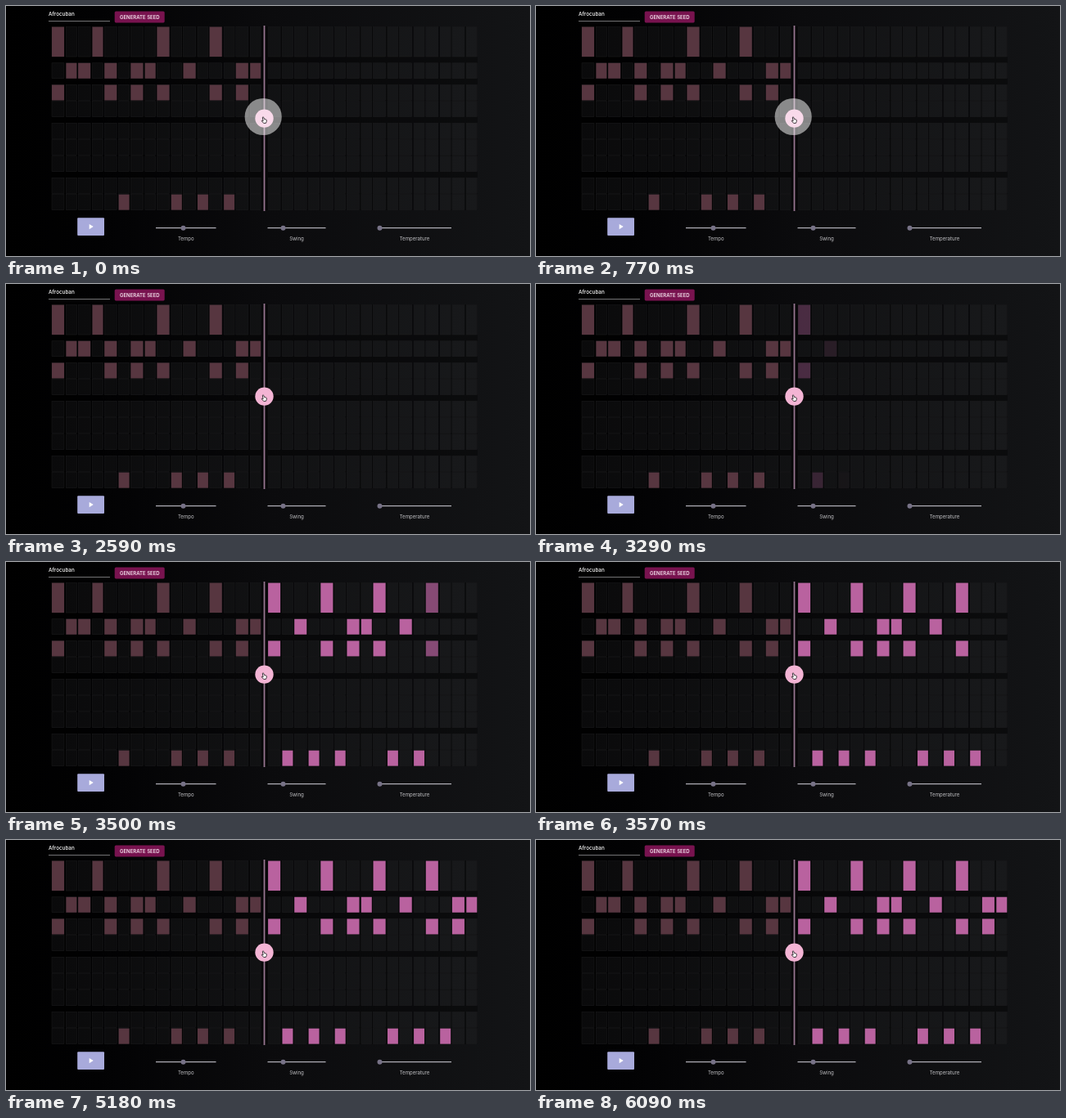
An HTML page for the animation above (6160 ms loop, 640 px wide and 306 px high).

```html
<!DOCTYPE html>
<html lang="en">
<head>
<meta charset="utf-8">
<title>Drum sequencer</title>
<style>
html, body { margin: 0; width: 100%; height: 100%; overflow: hidden; background: #000; }
svg { display: block; width: 100vw; height: 100vh; }
text { font-family: Inter, Roboto, sans-serif; }
.label { font-size: 6.1px; fill: #c2c2c5; text-anchor: middle; }
</style>
</head>
<body>
<svg id="stage" viewBox="0 0 640 306">
  <defs>
    <linearGradient id="bg">
      <stop offset="0" stop-color="#000"/>
      <stop offset=".18" stop-color="#020203"/>
      <stop offset=".5" stop-color="#0b0b0d"/>
      <stop offset="1" stop-color="#131416"/>
    </linearGradient>
    <linearGradient id="pad" gradientUnits="userSpaceOnUse" x1="56" x2="576">
      <stop stop-color="#0a0a0b"/>
      <stop offset="1" stop-color="#18191b"/>
    </linearGradient>
  </defs>
  <rect width="640" height="306" fill="url(#bg)"/>
  <text x="52" y="11.8" font-size="6.3" font-weight="500" fill="#fff">Afrocuban</text>
  <path d="M52 18.5H127" stroke="#737375"/>
  <rect x="132.7" y="6.4" width="61" height="14" rx="1.6" fill="#78134f"/>
  <text x="163.3" y="15.5" font-size="6" font-weight="600" fill="#f6e6ef" text-anchor="middle">GENERATE SEED</text>
  <rect x="55" y="25" width="521" height="225" opacity=".35"/>
  <g id="grid"></g>
  <path d="M315.5 24V251" stroke="#967590" stroke-width="1.8"/>
  <rect x="87.2" y="259.2" width="32.8" height="21.8" rx="1" fill="#a8aadb"/>
  <path d="M101.7 267V273.2L106.7 270.1Z" fill="#fff"/>
  <g id="sliders"></g>
  <circle cx="315.5" cy="137.6" r="11.2" fill="#f3b4d4"/>
  <circle id="ring" cx="314.2" cy="135.5" r="22.6" fill="#fff"/>
  <path d="M313.3 136.2q.9-.9 1.5.2l.7 2.1 1.7.3 1.1.8-.1 1.9-.8 1.9h-2.8l-2.3-2.6q-.1-.9 1-.5l.8.6Z"
    fill="#fff" stroke="#2b2128" stroke-width=".9" stroke-linejoin="round"/>
</svg>
<script>
const LOOP = 6160, STEP = 70, COLS = 16, LEFT = 56, RIGHT = 320.1;
const KICK = 0, SNARE = 1, HAT = 2, TOM = 8;

// One rule per drum: does it sound on column c?
const reply = {
  [KICK]: c => c % 4 === 0,
  [SNARE]: c => c % 4 === 2 || c % 8 === 7,
  [HAT]: c => c % 2 === 0 && c % 8 !== 2,
  [TOM]: c => c % 2 === 1 && c % 8 !== 7
};
const seed = {
  ...reply,
  [KICK]: c => c === 3 || c !== 4 && reply[KICK](c),
  [SNARE]: c => c === 1 || c === 4 || reply[SNARE](c),
  [TOM]: c => c > 4 && reply[TOM](c)
};

const $ = id => document.getElementById(id);
const clamp = v => Math.max(0, Math.min(1, v));

function add(parent, tag, attrs, text = "") {
  const el = document.createElementNS("http://www.w3.org/2000/svg", tag);
  for (const k in attrs) el.setAttribute(k, attrs[k]);
  el.textContent = text;
  return parent.appendChild(el);
}

// Columns come in pairs: a wide cell, then a narrow one.
function cell(left, col, y, height, style) {
  const odd = col % 2;
  const x = left + (col - odd) * 16.06 + odd * 17.4;
  return add($("grid"), "rect", { x, y, width: odd ? 12.9 : 15, height, ...style });
}

const notes = [];
let row = 0, y = 25.6;
for (const size of [1, 1, 2, 3, 2]) {
  for (let i = 0; i < size; i++, row++) {
    const height = row === KICK ? 36.4 : 18.9;
    for (let c = 0; c < COLS; c++) {
      for (const left of [LEFT, RIGHT])
        cell(left, c, y, height, { fill: "url(#pad)", stroke: "#1c1c1e", "stroke-width": .5 });
      if (seed[row]?.(c)) cell(LEFT, c, y, height, { fill: "#573640" });
      if (reply[row]?.(c)) notes.push({
        el: cell(RIGHT, c, y, height, { fill: "#b9629f" }),
        start: 3270 + 6 * c + 216 * (c / 14) ** 4
      });
    }
    y += height + 1.3;
  }
  y += 6.5;
}

function slider(name, x1, x2, knob) {
  const g = $("sliders");
  add(g, "path", { d: `M${x1} 271.6H${x2}`, stroke: "#aeadb5", "stroke-width": 1.1 });
  add(g, "circle", { cx: knob, cy: 271.8, r: 3, fill: "#777287" });
  add(g, "text", { x: (x1 + x2) / 2, y: 287, class: "label" }, name);
}
slider("Tempo", 183, 256.5, 216.5);
slider("Swing", 319.5, 390.5, 338.5);
slider("Temperature", 454, 544, 456.5);

function draw(now) {
  const t = Math.floor(now % LOOP / STEP) * STEP;
  $("ring").setAttribute("opacity", .51 * clamp((2380 - t) / 210));
  for (const { el, start } of notes) el.setAttribute("opacity", clamp((t - start) / 60));
}

const begin = performance.now();
function frame() {
  draw(performance.now() - begin);
  requestAnimationFrame(frame);
}
frame();
</script>
</body>
</html>
```
